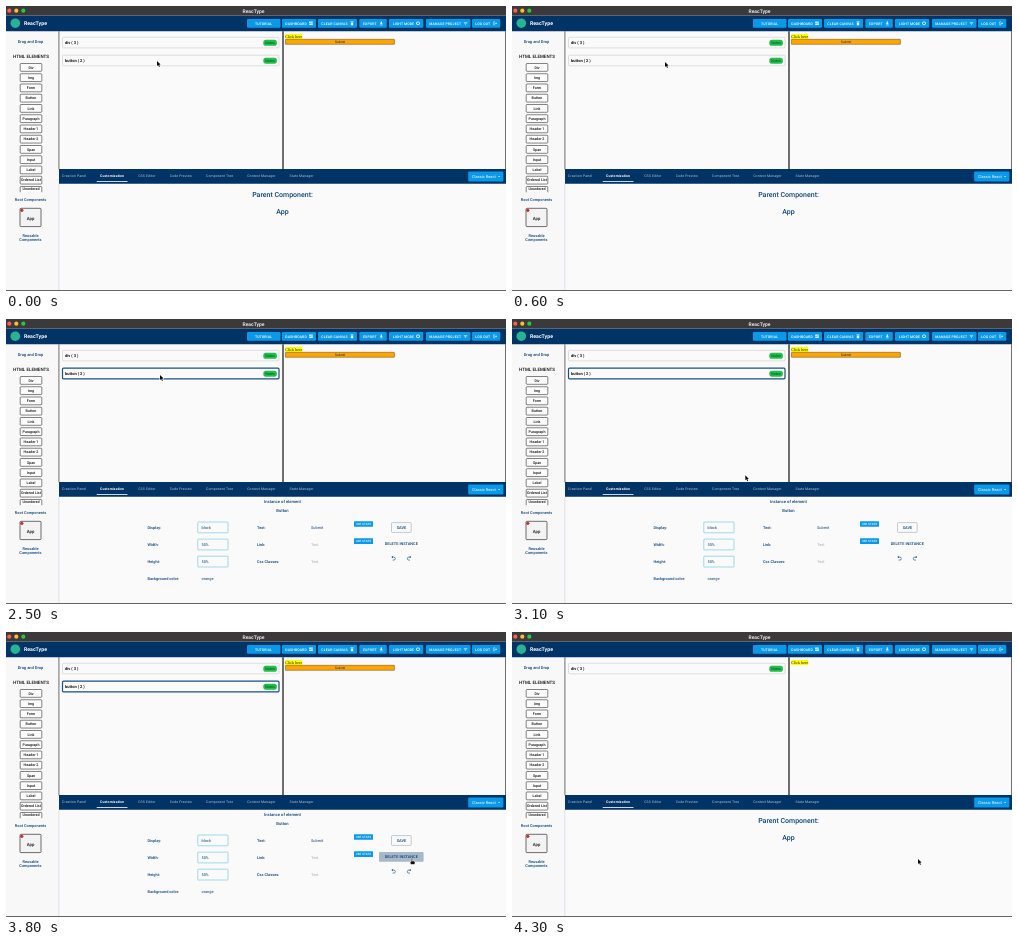
Recreate the animation shown at these times as an HTML page with a canvas. Size 500x285 px, loop 4800 ms.

```html
<!DOCTYPE html>
<html lang="en">
<head>
<meta charset="utf-8">
<title>ReacType</title>
<style>
html, body { margin: 0; width: 100%; height: 100%; overflow: hidden; background: #fafafa; }
canvas { display: block; width: 500px; height: 285px; }
</style>
</head>
<body>
<canvas id="stage"></canvas>
<script>
const W = 500, H = 285, LOOP = 4800, STEP = 100;
const NAVY = '#003366', BLUE = '#0a99e8', INK = '#0d4377', BLACK = '#111', PAPER = '#fafafa';
const SELECT_AT = 1200, HOVER_AT = 3600, DELETE_AT = 3900;

const canvas = document.getElementById('stage');
const ctx = canvas.getContext('2d');
const dpr = window.devicePixelRatio || 1;
canvas.width = W * dpr;
canvas.height = H * dpr;

// [time, x, y] of the pointer tip; it holds each place until the next one
const path = [
  [0, 151, 55], [100, 151, 54], [200, 150.5, 52.5], [300, 150.3, 51.3],
  [500, 152, 54.5], [600, 153, 56],
  [2500, 154, 56], [2600, 158, 62], [2700, 173, 84], [2800, 198, 120], [2900, 218.3, 151.5],
  [3100, 233.3, 156.3], [3200, 275, 173], [3300, 335, 200], [3400, 392, 222],
  [3500, 417.5, 229.5], [3600, 409, 228], [3700, 406, 227]
];

function box(x, y, w, h, fill, stroke, line = 0.5, r = 0) {
  ctx.beginPath();
  ctx.roundRect(x, y, w, h, r);
  if (fill) { ctx.fillStyle = fill; ctx.fill(); }
  if (stroke) { ctx.strokeStyle = stroke; ctx.lineWidth = line; ctx.stroke(); }
}

function dot(x, y, r, fill) {
  ctx.beginPath();
  ctx.arc(x, y, r, 0, Math.PI * 2);
  ctx.fillStyle = fill;
  ctx.fill();
}

function shape(points, fill, stroke, line = 0.5) {
  ctx.beginPath();
  points.forEach(([x, y], i) => i ? ctx.lineTo(x, y) : ctx.moveTo(x, y));
  if (fill) { ctx.closePath(); ctx.fillStyle = fill; ctx.fill(); }
  if (stroke) { ctx.strokeStyle = stroke; ctx.lineWidth = line; ctx.stroke(); }
}

// y is the middle of the capitals
function text(str, x, y, size, color, { weight = 500, align = 'left', gap = 0, family = 'Roboto, sans-serif' } = {}) {
  ctx.font = `${weight} ${size}px ${family}`;
  ctx.textAlign = align;
  ctx.letterSpacing = gap * size + 'px';
  ctx.fillStyle = color;
  ctx.fillText(str, x, y + size * 0.355);
}

const centered = (str, x, y, size, color, weight = 500) =>
  text(str, x, y, size, color, { weight, align: 'center' });

function windowBar() {
  box(0, 0, W, 9.5, '#3b3939');
  ['#ff5f57', '#febc2e', '#28c840'].forEach((c, i) => dot(3.3 + i * 7, 4.7, 2.1, c));
  centered('ReacType', 247.5, 4.8, 5, '#e4e2e2', 700);
}

const icons = {
  grid(x, y) {
    for (const [dx, dy, h] of [[-1.7, -1.7, 2], [0.2, -1.7, 1.2], [-1.7, 0.7, 1.1], [0.2, -0.1, 1.9]])
      box(x + dx, y + dy, 1.5, h, '#fff');
  },
  trash(x, y) {
    box(x - 1.2, y - 0.9, 2.4, 2.9, '#fff', null, 0, 0.3);
    box(x - 1.5, y - 1.8, 3, 0.6, '#fff');
  },
  down(x, y) {
    shape([[x - 0.6, y - 1.8], [x + 0.6, y - 1.8], [x + 0.6, y - 0.4], [x + 1.5, y - 0.4],
      [x, y + 1.1], [x - 1.5, y - 0.4], [x - 0.6, y - 0.4]], '#fff');
    box(x - 1.5, y + 1.4, 3, 0.5, '#fff');
  },
  sun(x, y) {
    box(x - 1.4, y - 1.4, 2.8, 2.8, '#fff');
    ctx.save();
    ctx.translate(x, y);
    ctx.rotate(Math.PI / 4);
    box(-1.4, -1.4, 2.8, 2.8, '#fff');
    ctx.restore();
    dot(x, y, 1.1, BLUE);
  },
  list(x, y) {
    [1.7, 1.1, 0.5].forEach((w, i) => box(x - w, y - 1.2 + i, w * 2, 0.5, '#fff'));
  },
  exit(x, y) {
    shape([[x - 0.2, y - 1.5], [x - 1.6, y - 1.5], [x - 1.6, y + 1.5], [x - 0.2, y + 1.5]], null, '#fff', 0.5);
    shape([[x - 0.7, y - 0.3], [x + 0.5, y - 0.3], [x + 0.5, y - 1.1], [x + 1.7, y],
      [x + 0.5, y + 1.1], [x + 0.5, y + 0.3], [x - 0.7, y + 0.3]], '#fff');
  }
};

function header() {
  box(0, 9.5, W, 15.8, NAVY);
  dot(9.3, 17.2, 4.8, '#27b495');
  text('ReacType', 18, 17.2, 5.2, '#fff', { weight: 700 });
  const buttons = [
    ['TUTORIAL', 241, 33.5, 249], ['DASHBOARD', 276, 34, 279.3, 'grid', 305],
    ['CLEAR CANVAS', 312, 39, 315.3, 'trash', 346], ['EXPORT', 353.3, 27.5, 357, 'down', 375.3],
    ['LIGHT MODE', 383, 34.3, 386.8, 'sun', 412], ['MANAGE PROJECT', 420, 44.5, 423.3, 'list', 459.5],
    ['LOG OUT', 466, 28.3, 469.3, 'exit', 489.3]
  ];
  for (const [label, x, w, tx, icon, ix] of buttons) {
    box(x, 13, w, 8.7, BLUE, null, 0, 1);
    text(label, tx, 17.4, 3.5, '#fff', { gap: 0.0286 });
    if (icon) icons[icon](ix, 17.3);
  }
}

function sidebar() {
  box(0, 25.3, 53, H - 25.3, '#f8f8f9');
  centered('Drag and Drop', 24.5, 35.5, 4, INK);
  centered('HTML ELEMENTS', 25, 50, 4.5, BLACK);
  ctx.save();
  ctx.beginPath();
  ctx.rect(0, 55, 53, 131.3);
  ctx.clip();
  const items = ['Div', 'Img', 'Form', 'Button', 'Link', 'Paragraph', 'Header 1', 'Header 2',
    'Span', 'Input', 'Label', 'Ordered List', 'Unordered'];
  items.forEach((name, i) => {
    const y = 61.4 + i * 10.25, last = i === items.length - 1;
    box(14.2, y - 3.9, 21.6, last ? 12 : 7.8, '#fcfcfc', '#333', 0.6, 0.8);
    centered(name, 25, last ? 183 : y, 3.65, BLACK);
  });
  centered('List', 25, 187.3, 3.65, BLACK);
  ctx.restore();
  centered('Root Components', 24.5, 193.8, 3.9, INK);
  box(14, 202.3, 21, 18.3, '#f3f3f4', '#333', 0.7, 1);
  dot(15.8, 204.3, 1.6, '#c5302c');
  centered('App', 24.5, 212.8, 4.3, BLACK);
  centered('Reusable', 24.5, 229.7, 3.9, INK);
  centered('Components', 24.5, 234, 3.9, INK);
}

function row(name, y, selected) {
  box(56.5, y, 216.5, 10.6, PAPER, selected ? '#1d4f80' : '#c9c9c9', selected ? 1.2 : 0.6, 1);
  text(name, 59, y + 5.2, 4, BLACK, { weight: 700 });
  box(257.3, y + 2.5, 13.6, 6, '#1fbf4a', null, 0, 2.6);
  centered('Notes', 264.1, y + 5.5, 3.6, '#0b4a20', 400);
}

function panels(deleted, selected) {
  row('div ( 3 )', 31.3, false);
  if (!deleted) row('button ( 2 )', 49.2, selected);
  box(279.2, 28, 17, 5, '#ffff00');
  text('Click here', 279.3, 30.7, 4.1, BLACK, { weight: 400, family: '"Liberation Serif", serif' });
  if (!deleted) {
    box(279.4, 33.3, 109, 5, '#ffa500', '#5a4420', 0.5, 0.3);
    text('Submit', 334, 35.7, 3.4, '#222', { weight: 400, align: 'center', family: '"Liberation Sans", sans-serif' });
  }
  box(52.6, 25.3, 0.7, 138, '#333');
  box(52.7, 177.5, 0.5, 107, '#c4c8cc');
  box(276.4, 25.3, 1.2, 138, '#111');
  box(499.3, 25.3, 0.7, 138, '#333');
}

function tabs() {
  box(53, 163, 447, 14.7, NAVY);
  const names = [['Creation Panel', 56], ['Customization', 94], ['CSS Editor', 132.2], ['Code Preview', 163.7],
    ['Component Tree', 200], ['Context Manager', 241.2], ['State Manager', 283.5]];
  names.forEach(([name, x], i) =>
    text(name, x, 169.5, 3.5, i === 1 ? '#fff' : '#b3c2d1', { weight: i === 1 ? 700 : 400, gap: 0.0286 }));
  box(90.7, 175, 30.8, 0.8, '#fff');
  box(462.2, 165.4, 35.2, 10.2, BLUE, null, 0, 1);
  text('Classic React', 466, 170.4, 3.95, '#fff', { weight: 400 });
  shape([[492, 169.9], [494.2, 169.9], [493.1, 171.1]], '#fff');
}

function arrow(x, y, dir) {
  ctx.save();
  ctx.translate(x, y);
  ctx.scale(dir, 1);
  ctx.beginPath();
  ctx.moveTo(-1.6, -0.9);
  ctx.lineTo(0.2, -0.9);
  ctx.arc(0.2, 0.6, 1.5, -Math.PI / 2, Math.PI / 2);
  ctx.lineTo(-1, 2.1);
  ctx.strokeStyle = INK;
  ctx.lineWidth = 0.6;
  ctx.stroke();
  shape([[-2.2, -0.9], [-0.8, -2.1], [-0.8, 0.3]], INK);
  ctx.restore();
}

function overview() {
  centered('Parent Component:', 276.5, 189, 7, INK);
  centered('App', 276.5, 205.3, 7, INK);
}

function form(hover) {
  centered('Instance of element', 276.5, 183, 4.15, INK);
  centered('Button', 276.5, 191.7, 4.15, INK);
  const lines = [
    ['Display:', 'block', 'Text:', 'Submit'],
    ['Width:', '50%', 'Link:', 'Text'],
    ['Height:', '50%', 'Css Classes:', 'Text']
  ];
  lines.forEach(([label, value, label2, value2], i) => {
    const y = 208.5 + i * 17.1;
    text(label, 141.5, y, 3.9, INK);
    box(191.8, y - 5.5, 30.2, 10.8, PAPER, '#62c3e0', 0.6, 0.6);
    text(value, 195.5, y, 3.9, INK, { weight: 400 });
    text(label2, 251, y, 3.9, INK);
    text(value2, 305, y, 3.9, i ? '#a9acb0' : INK, { weight: 400 });
    if (i < 2) {
      box(348, y - 6.3, 19, 5.6, BLUE, null, 0, 0.5);
      text('USE STATE', 349.7, y - 3.5, 2.95, '#fff', { gap: 0.0286 });
    }
  });
  text('Background color:', 141.5, 260, 3.9, INK);
  text('orange', 195.5, 260, 3.9, INK, { weight: 400 });
  box(385.5, 203.6, 19.7, 9.8, null, '#8b9bab', 0.5, 0.8);
  centered('SAVE', 395.4, 208.6, 3.9, INK);
  if (hover) box(373, 220, 44.6, 9.8, '#a9b8c9', null, 0, 0.8);
  centered('DELETE INSTANCE', 395.3, 224.9, 3.9, INK);
  arrow(387.6, 239, 1);
  arrow(403, 239, -1);
}

function pointer(x, y, hand) {
  ctx.save();
  ctx.translate(x, y);
  ctx.lineJoin = 'round';
  if (hand) {
    box(-1.7, 2, 4.6, 3.6, '#111', '#fff', 0.7, 1.1);
    box(-0.7, -0.9, 1.3, 4.5, '#111', '#fff', 0.5, 0.6);
    box(-1.2, 2.5, 3.6, 2.6, '#111', null, 0, 0.8);
  } else {
    const outline = [[0, 0], [0, 5], [1.2, 4], [2, 5.9], [2.9, 5.5], [2.1, 3.7], [3.6, 3.6], [0, 0]];
    shape(outline, null, '#fff', 1.1);
    shape(outline, '#0a0a0a');
  }
  ctx.restore();
}

function draw(t) {
  const selected = t >= SELECT_AT && t < DELETE_AT;
  const hover = t >= HOVER_AT && t < DELETE_AT;
  ctx.setTransform(dpr, 0, 0, dpr, 0, 0);
  ctx.textRendering = 'geometricPrecision';
  box(0, 0, W, H, PAPER);
  sidebar();
  panels(t >= DELETE_AT, selected);
  tabs();
  header();
  windowBar();
  if (selected) form(hover); else overview();
  box(0, 284.3, W, 0.7, '#333');
  const [, x, y] = path.filter(p => p[0] <= t).pop();
  pointer(x, y, hover);
}

function tick() {
  const t = performance.now() % LOOP;
  draw(Math.floor(t / STEP) * STEP);
  requestAnimationFrame(tick);
}
tick();
</script>
</body>
</html>
```
